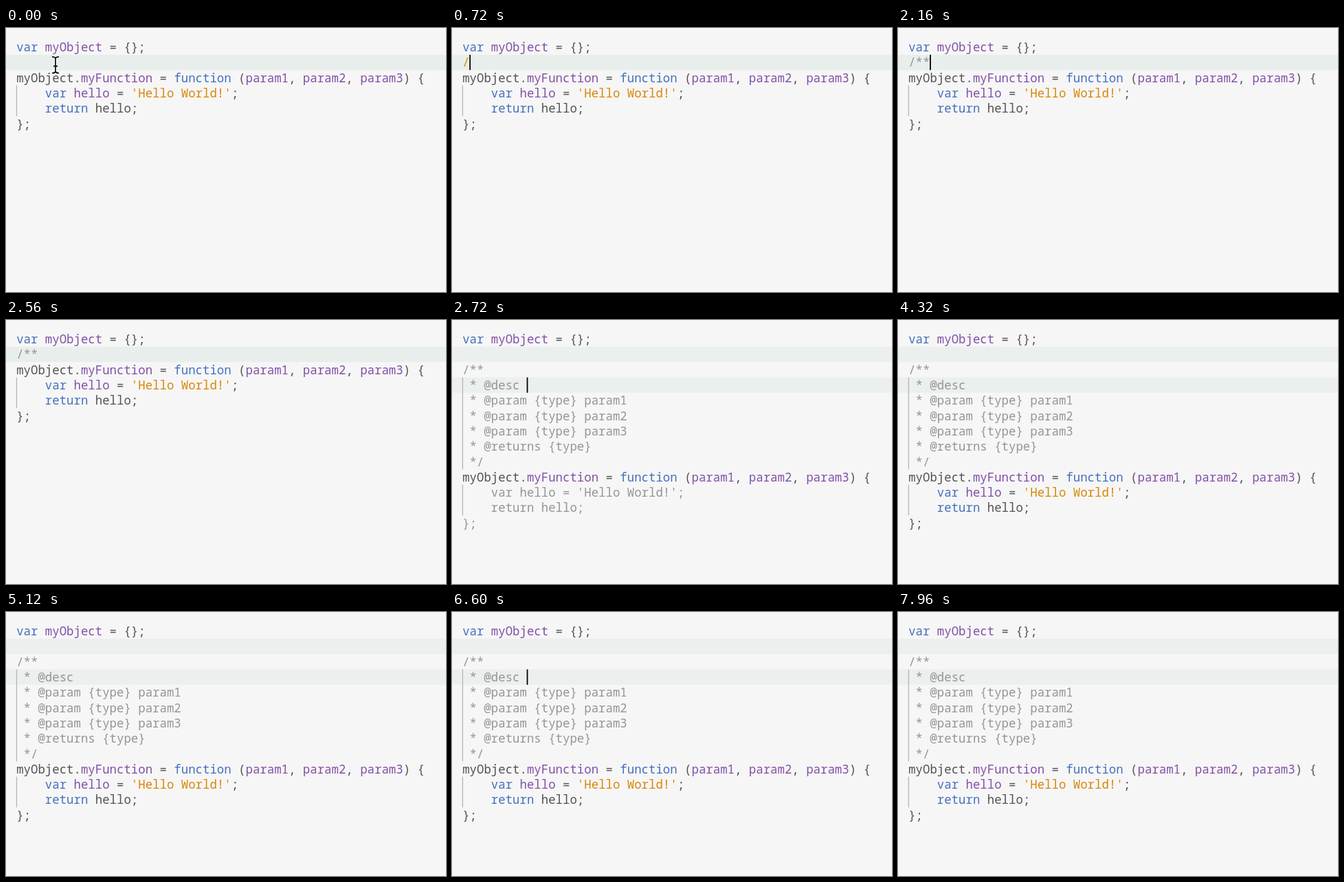
Recreate the animation shown at these times as an HTML page. Size 640 by 384 pixels, loop 8 s.

```html
<!DOCTYPE html>
<html lang="en">
<head>
<meta charset="utf-8">
<title>Doc comment completion</title>
<style>
  html, body { margin: 0; width: 100%; height: 100%; overflow: hidden; background: #f6f6f6; }
  svg { display: block; width: 640px; height: 384px; }
  text { font: 500 17.36px "Noto Sans Mono", "DejaVu Sans Mono", monospace; white-space: pre; fill: #535353; }
  .keyword { fill: #446fbd; }
  .name { fill: #8250a8; }
  .string { fill: #d98609; }
  .comment { fill: #959595; }
  .band { fill: #e8eeec; }
  .faded { fill: #ebefee; }
  .guide { fill: #b5b5b5; }
</style>
</head>
<body>
<svg id="stage" viewBox="0 0 640 384"></svg>
<script>
const LOOP = 8000, LEFT = 15.2, CHAR = 10.416, LINE = 22.3;
const EXPAND = 2600, RECOLOR = 3000;
const KEYS = [600, 1240, 1880];
const BLINK = 950;

const declaration = "var myObject = {};";
const signature = "myObject.myFunction = function (param1, param2, param3) {";
const body = ["    var hello = 'Hello World!';", "    return hello;", "};"];
const docs = ["/**", " * @desc ", ...[1, 2, 3].map(n => ` * @param {type} param${n}`),
  " * @returns {type}", " */"];

const lineTop = row => 16.6 + row * LINE;
const span = (kind, text) => `<tspan class="${kind}">${text}</tspan>`;

const highlight = code => code.replace(
  /('[^']*')|\b(var|function|return)\b|\b(myFunction|param\d|\w+(?= = [{']))/g,
  (text, string, keyword) => span(string ? "string" : keyword ? "keyword" : "name", text));

const textLine = (row, content) =>
  `<text x="${LEFT}" y="${lineTop(row) + 17.5}">${content}</text>`;

const band = (row, kind) =>
  `<rect class="${kind}" y="${lineTop(row)}" width="640" height="${LINE}"/>`;

const guide = (row, count) =>
  `<rect class="guide" x="14.8" y="${lineTop(row)}" width="1.3" height="${count * LINE}"/>`;

const caret = (row, column) =>
  `<rect x="${LEFT + column * CHAR - 0.3}" y="${lineTop(row)}" width="1.8" height="${LINE}"/>`;

const beam = "M67 41.8 Q71 41.8 72 44 Q73 41.8 77 41.8 M72 44 V63.5 M67 65.6 Q71 65.6 72 63.5 Q73 65.6 77 65.6 M69 55.5 H75";
const pointer = `<g fill="none">
  <path d="${beam}" stroke="#fff" stroke-width="3.6"/>
  <path d="${beam}" stroke="#111" stroke-width="1.8"/></g>`;

const blinkOn = since => since % BLINK < BLINK / 2;

function typingScene(t) {
  const typed = KEYS.filter(key => t >= key).length;
  const code = [signature, ...body].map(highlight);
  let scene = band(1, "band") + guide(3, 2) + textLine(0, highlight(declaration));
  scene += textLine(1, span(typed > 1 ? "comment" : "string", "/**".slice(0, typed)));
  scene += code.map((content, i) => textLine(i + 2, content)).join("");
  if (!typed) return scene + pointer;
  return scene + (blinkOn(t - KEYS[typed - 1]) ? caret(1, typed) : "");
}

function expandedScene(t) {
  const tint = t < RECOLOR ? line => span("comment", line) : highlight;
  const lines = [highlight(declaration), "", ...docs.map(line => span("comment", line)),
    highlight(signature), ...body.map(tint)];
  return band(1, "faded") + band(3, "faded") + guide(3, 6) + guide(10, 2) +
    lines.map((content, row) => textLine(row, content)).join("") +
    (blinkOn(t - EXPAND) ? caret(3, docs[1].length) : "");
}

const stage = document.getElementById("stage");
let shown = "";

function draw() {
  const t = performance.now() % LOOP;
  const scene = t < EXPAND ? typingScene(t) : expandedScene(t);
  if (scene !== shown) stage.innerHTML = shown = scene;
  requestAnimationFrame(draw);
}
draw();
</script>
</body>
</html>
```
